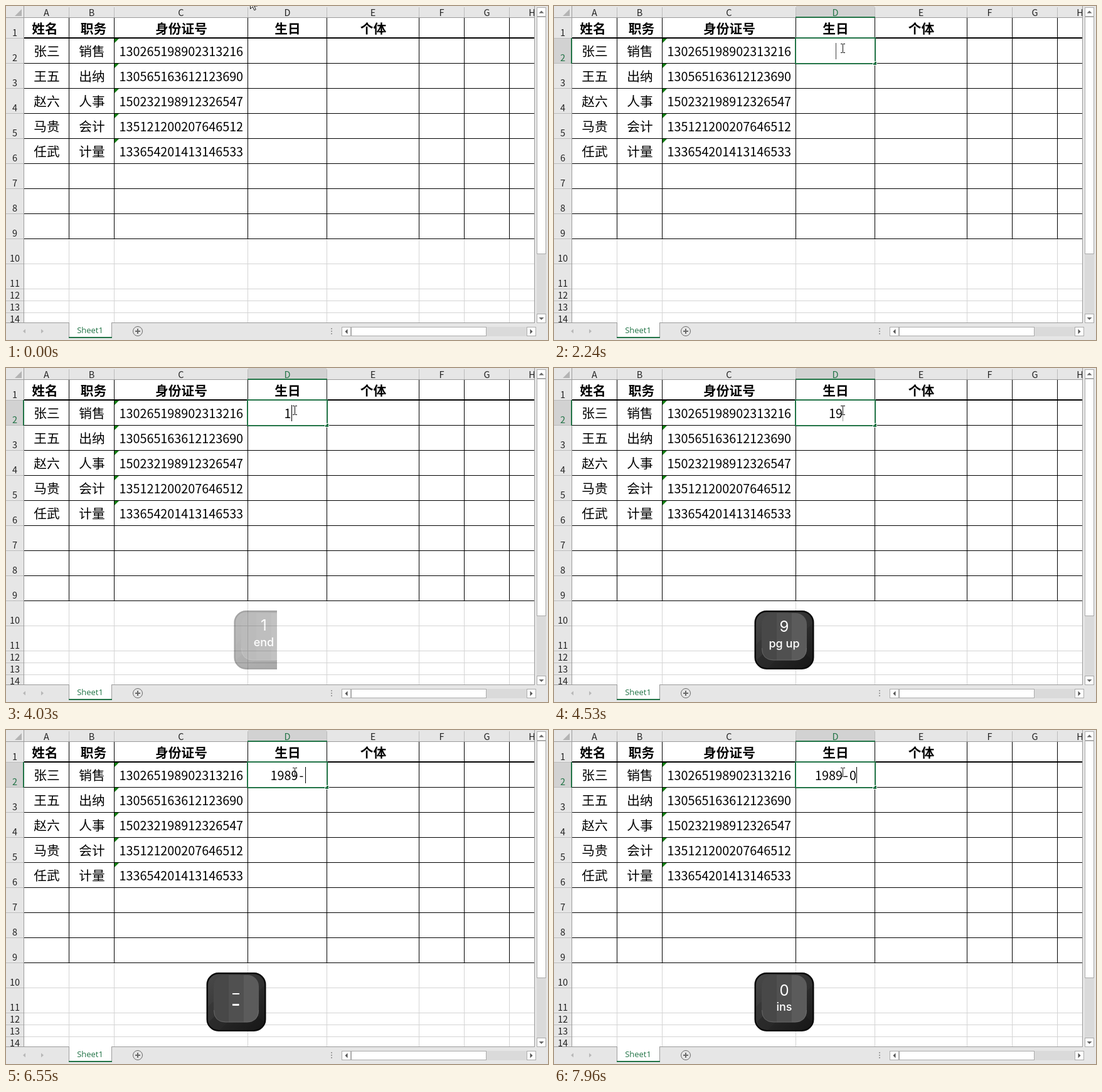
Write an HTML page that moves like this. It is 864 by 533 pixels and loops after 8000 ms.

```html
<!DOCTYPE html>
<html lang="zh-CN">
<head>
<meta charset="utf-8">
<title>Sheet1</title>
<style>
  html, body { margin: 0; width: 100%; height: 100%; overflow: hidden; background: #fff; }
  svg { display: block; width: 864px; height: 533px; }
  text { font-family: "Noto Sans CJK SC", "Noto Sans CJK", sans-serif; text-anchor: middle; white-space: pre; }
  rect, .crisp { shape-rendering: crispEdges; }
  .round { shape-rendering: auto; }
  .cjk { font-size: 20.7px; font-weight: 350; }
  .num { font-size: 19.8px; font-weight: 350; }
  .title { font-size: 20.7px; font-weight: 700; }
  .head { font-size: 14.5px; font-weight: 350; fill: #222; }
  .tab { font: 13px "Open Sans", sans-serif; fill: #217346; }
  .cap { font-family: Inter, sans-serif; fill: #fff; }
</style>
</head>
<body>
<svg id="stage" viewBox="0 0 864 533" xmlns="http://www.w3.org/2000/svg">
  <defs>
    <clipPath id="cells"><rect x="0" y="0" width="842" height="505"/></clipPath>
    <clipPath id="panel"><rect x="305" y="372" width="127" height="125"/></clipPath>
    <linearGradient id="side" x1="0" y1="0" x2="1" y2="1">
      <stop offset="0" stop-color="#4a4a4a"/><stop offset=".3" stop-color="#3d3d3d"/>
      <stop offset=".3" stop-color="#383838"/><stop offset=".6" stop-color="#303030"/>
      <stop offset=".6" stop-color="#2b2b2b"/><stop offset="1" stop-color="#181818"/>
    </linearGradient>
    <linearGradient id="face">
      <stop offset=".33" stop-color="#484848"/><stop offset=".33" stop-color="#505050"/>
      <stop offset=".67" stop-color="#505050"/><stop offset=".67" stop-color="#5b5b5b"/>
    </linearGradient>
  </defs>
</svg>
<script>
const NS = 'http://www.w3.org/2000/svg';
const LOOP = 8000;
const GREEN = '#217346';
const stage = document.getElementById('stage');

function add(parent, tag, attrs, content) {
  const el = document.createElementNS(NS, tag);
  for (const k in attrs) el.setAttribute(k, attrs[k]);
  if (content !== undefined) el.textContent = content;
  parent.appendChild(el);
  return el;
}
const group = (parent, attrs) => add(parent, 'g', attrs || {});
const box = (parent, x, y, width, height, fill, more) =>
  add(parent, 'rect', { x, y, width, height, fill, ...more });
const label = (parent, cls, x, y, s) => add(parent, 'text', { class: cls, x, y }, s);
const path = (parent, d, fill, more) => add(parent, 'path', { d, fill, ...more });
const show = (el, on) => el.setAttribute('visibility', on ? 'visible' : 'hidden');

// Sheet geometry: right edges of columns, bottom edges of rows
const cols = [28, 100, 172, 385, 511, 658, 730, 802, 874];
const rows = [18, 51, 91, 131, 171, 211, 251, 291, 331, 371, 411, 451, 470, 489, 508];
const people = [
  ['张三', '销售', '130265198902313216'],
  ['王五', '出纳', '130565163612123690'],
  ['赵六', '人事', '150232198912326547'],
  ['马贵', '会计', '135121200207646512'],
  ['任武', '计量', '133654201413146533']
];
const titles = [['姓名', 62], ['职务', 139.5], ['身份证号', 279.5], ['生日', 449], ['个体', 585.5]];

box(stage, 0, 0, 864, 533, '#e6e6e6');
const sheet = group(stage, { 'clip-path': 'url(#cells)' });
box(sheet, 29, 19, 813, 486, '#fff');

for (const x of cols.slice(1)) {
  box(sheet, x, 372, 1, 140, '#d4d4d4');
  box(sheet, x, 2, 1, 16, '#bcbcbc');
  box(sheet, x, 19, 1, 353, '#000');
}
rows.slice(1).forEach((y, i) => {
  box(sheet, 29, y, 813, 1, i < 9 ? '#000' : '#d4d4d4');
  box(sheet, 0, y, 28, 1, '#bcbcbc');
});
box(sheet, 29, 50, 813, 1, '#000');
box(sheet, 0, 18, 842, 1, '#9b9b9b');
box(sheet, 28, 0, 1, 505, '#9b9b9b');
path(sheet, 'M25 5V16H14Z', '#b4b4b4');

// Highlighted headers of the active cell
const active = group(sheet);
box(active, 386, 0, 125, 17, '#d2d2d2');
box(active, 385, 17, 127, 2, GREEN);
box(active, 0, 52, 27, 39, '#d2d2d2');
box(active, 27, 51, 2, 41, GREEN);

const colHeads = [...'ABCDEFGH'].map((c, i) =>
  label(sheet, 'head', (cols[i] + cols[i + 1] + 1) / 2, 16, c));
const rowHeads = rows.slice(1).map((y, i) => label(sheet, 'head', 14, y - 3, i + 1));

for (const [s, x] of titles) label(sheet, 'title', x, 44, s);
people.forEach(([name, job, id], i) => {
  const y = 80 + 40 * i;
  label(sheet, 'cjk', 65, y, name);
  label(sheet, 'cjk', 137, y, job);
  label(sheet, 'num', 279.3, y, id);
  path(sheet, `M173 ${y - 28}h7l-7 7z`, '#117c11');
});

// Selection frame, fill handle, typed text and caret
const frame = group(sheet);
box(frame, 385, 51, 127, 41, 'none', { stroke: GREEN, 'stroke-width': 2 });
box(frame, 508, 88, 7, 7, '#fff');
box(frame, 509, 89, 5, 5, GREEN);
const editCover = box(frame, 506, 86, 5, 5, '#fff');
const typed = label(sheet, 'num', 449, 80, '');
const caret = box(sheet, 449, 59, 1, 26, '#000');

// Scroll bars and sheet tabs
box(stage, 842, 0, 1, 506, '#9b9b9b');
box(stage, 0, 505, 843, 1, '#9b9b9b');
const button = (x, y, w, h) =>
  box(stage, x + .5, y + .5, w - 1, h - 1, '#fff', { stroke: '#ababab', class: 'round' });
box(stage, 846, 17, 15, 474, '#dadada');
button(846, 2, 15, 15);
button(846, 17, 15, 379);
button(846, 491, 15, 15);
path(stage, 'M849.5 11.5h8l-4-4z', '#666');
path(stage, 'M849.5 497h8l-4 4z', '#666');
box(stage, 535, 512, 310, 15, '#dadada');
button(535, 512, 15, 15);
button(550, 512, 216, 15);
button(830, 512, 15, 15);
path(stage, 'M544.5 515.5v8l-4-4z', '#555');
path(stage, 'M835.5 515.5v8l4-4z', '#555');
for (const y of [514, 518, 522]) box(stage, 518, y, 2, 2, '#a0a0a0');

box(stage, 100, 505, 69, 25, '#9b9b9b');
box(stage, 101, 505, 67, 24, '#fff');
box(stage, 100, 528, 69, 2, GREEN);
label(stage, 'tab', 134, 522, 'Sheet1');
path(stage, 'M31 515.5v7l-4-3.5z', '#b8b8b8');
path(stage, 'M56 515.5v7l4-3.5z', '#b8b8b8');
add(stage, 'circle', { cx: 210, cy: 519, r: 7.5, fill: 'none', stroke: '#6a6a6a' });
box(stage, 206, 518, 8, 2, '#6a6a6a');
box(stage, 209, 515, 2, 8, '#6a6a6a');

// On-screen key cap
const panel = group(stage, { 'clip-path': 'url(#panel)' });
const key = group(panel);
box(key, 320.75, 388.25, 92.5, 91.5, 'url(#side)',
  { rx: 18, stroke: '#0a0a0a', 'stroke-width': 2.5, class: 'round' });
path(key, 'M324 465L335 455H399L410 465Q408 478 395 478H339Q326 478 324 465Z', '#111', { opacity: .25 });
box(key, 331, 391, 72, 75.5, 'url(#face)', { rx: 18, class: 'round' });
path(key, 'M331.5 447Q331.5 466 350 466H384Q402.5 466 402.5 447', 'none', { stroke: '#777', opacity: .6 });
const capTop = add(key, 'text', { class: 'cap', x: 367, 'font-size': 24 });
const capSub = add(key, 'text', { class: 'cap', x: 367, 'font-size': 18, 'font-weight': 500 });
const bars = group(key);
box(bars, 361, 420, 11, 2, '#fff', { class: 'round' });
box(bars, 361, 437, 10.5, 3, '#fff', { class: 'round' });

// Pointers
const arrow = path(stage, 'M.5 .5V16.5L4.3 13L6.8 18.7L9.2 17.7L6.7 12H11.8Z', '#fff', { stroke: '#111' });
const beam = path(stage, 'M457 60.5h3M461 60.5h3M460.5 61v13M457 74.5h3M461 74.5h3', 'none',
  { stroke: '#111', class: 'crisp' });

// time, cell text, key cap labels, their baselines
const strokes = [
  [3780, '1', '1', 'end', 419, 444],
  [4070, '19', '9', 'pg up', 421, 446],
  [4910, '198', '8', 'up', 421, 446],
  [5120, '1989', '9', 'pg up', 421, 446],
  [6550, '1989-', '', '', 421, 446],
  [7960, '1989-0', '0', 'ins', 424, 448]
];
// caret fades: start, duration, end opacity
const blinks = [
  [1770, 40, 1], [2240, 90, 0], [2750, 150, 1], [3320, 90, 0], [3780, 0, 1],
  [4490, 90, 0], [4910, 0, 1], [5570, 130, 0], [6130, 90, 1],
  [6980, 90, 0], [7490, 140, 1]
];
const SELECT = 1070, EDIT = 1770;
const ramp = (t, a, b) => Math.min(1, Math.max(0, (t - a) / (b - a)));

function caretAlpha(t) {
  let alpha = 0;
  for (const [start, dur, goal] of blinks) {
    if (t < start) break;
    // the first step of a fade is already partly done
    const p = dur ? .25 + .75 * ramp(t, start, start + dur) : 1;
    alpha += (goal - alpha) * p;
  }
  return alpha;
}

function drawTyping(t) {
  const now = strokes.filter(s => s[0] <= t).pop();
  const str = now ? now[1] : '';
  const left = 449 - str.length * 5.5;
  typed.textContent = str;
  typed.setAttribute('x', [...str].map((c, i) => left + 5.5 + 11 * i).join(' ') || 449);
  caret.setAttribute('x', Math.floor(449.5 + str.length * 5.5));
  caret.setAttribute('opacity', caretAlpha(t));

  show(panel, now);
  show(bars, now && !now[2]);
  if (!now) return;
  capTop.textContent = now[2];
  capSub.textContent = now[3];
  capTop.setAttribute('y', now[4]);
  capSub.setAttribute('y', now[5]);
  const p = ramp(t, 3800, 4180);
  key.setAttribute('transform', `translate(${112 * (1 - p)} 0)`);
  key.setAttribute('opacity', p * p);
}

function draw(t) {
  const selected = t >= SELECT, editing = t >= EDIT;
  show(active, selected);
  show(frame, selected);
  show(editCover, editing);
  colHeads[3].style.fill = rowHeads[1].style.fill = selected ? GREEN : '';

  const p = ramp(t, 250, 780), e = p * p * (3 - 2 * p);
  arrow.setAttribute('transform', `translate(${389 + 69 * e} ${-12 + 78 * e})`);
  show(arrow, !editing);
  show(beam, editing);
  drawTyping(t);
}

const origin = performance.now();
function tick() {
  draw((performance.now() - origin) % LOOP);
  requestAnimationFrame(tick);
}
draw(0);
tick();
</script>
</body>
</html>
```
